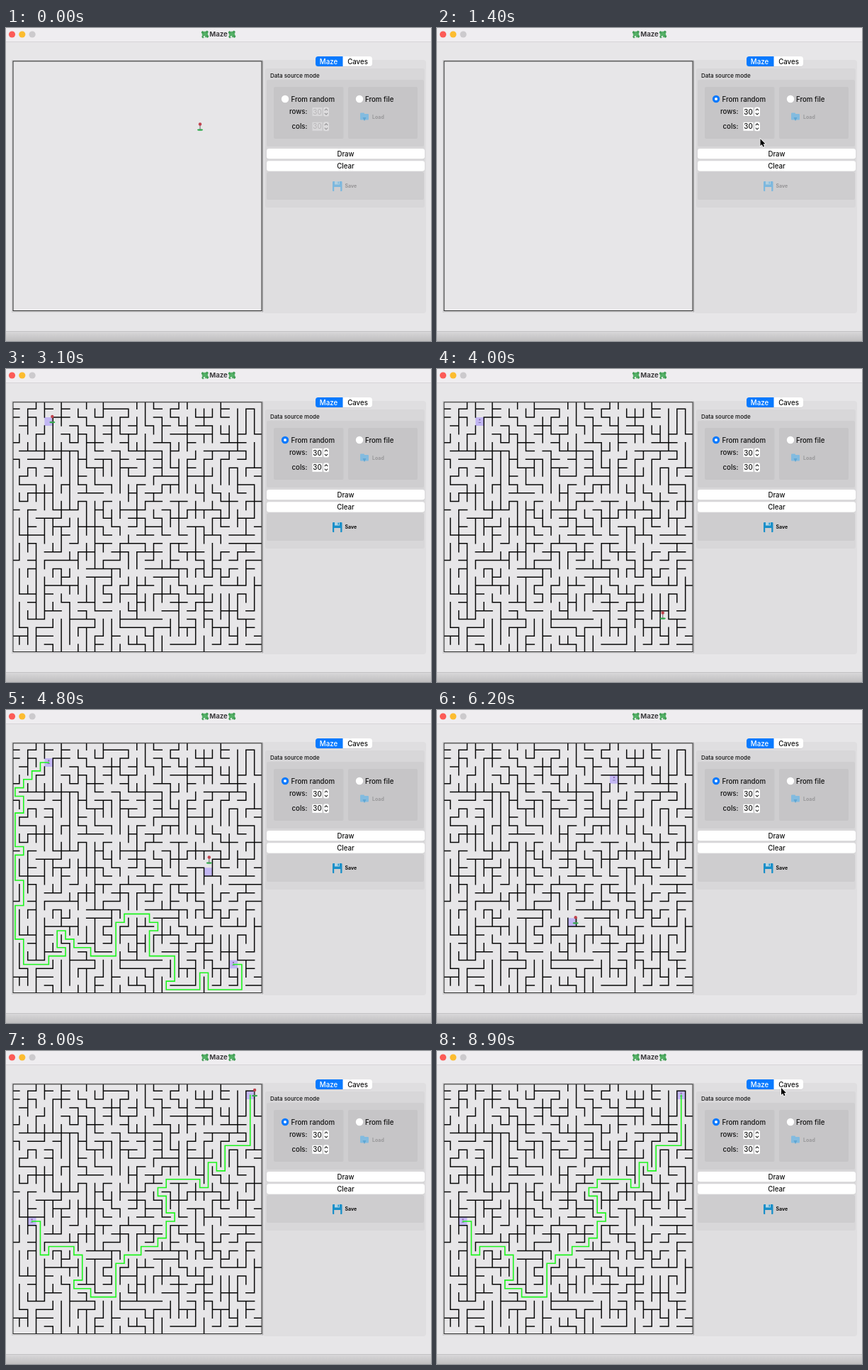
Animation, 600 px wide and 441 px high, one loop 9 s. Source, as an HTML page with a canvas:

```html
<!DOCTYPE html>
<html lang="en">
<head>
<meta charset="utf-8">
<title>Maze</title>
<style>
html, body { margin: 0; width: 100%; height: 100%; overflow: hidden; background: #e7e6e8; }
canvas { display: block; }
</style>
</head>
<body>
<canvas id="stage" width="600" height="441"></canvas>
<script>
const ctx = document.getElementById('stage').getContext('2d');
const LOOP = 9000, STEP = 100, LAG = 150;
const CHOOSE = 1000, DRAW = 1800;
const N = 30, CELL = 11.85, X0 = 7, Y0 = 44.4;
const FONT = 'Inter, "Open Sans", sans-serif';
const INK = '#101010';

// Key cells of the passages that are opened first; the rest of the maze is random.
const corridors = [
  [[4, 2], [0, 6], [1, 8], [0, 12], [1, 13], [0, 16], [1, 19], [0, 23], [1, 26], [4, 25], [6, 24], [5, 22],
    [7, 24], [9, 25], [12, 25], [12, 21], [13, 20], [16, 21], [17, 22], [16, 25], [19, 25], [19, 28],
    [18, 29], [22, 29], [22, 27], [23, 29], [27, 29], [27, 26], [26, 26]],
  [[2, 16], [3, 20], [4, 19], [7, 20], [8, 23], [7, 24]],
  [[13, 20], [17, 18], [19, 15], [17, 12], [18, 11], [22, 12], [23, 9], [24, 10], [25, 7], [28, 7], [28, 1]],
  [[15, 21], [15, 20]],
  [[20, 4], [20, 11]]
];

const trips = [
  [{ t: 3100, cell: [4, 2] }, { t: 4100, cell: [26, 26] }],
  [{ t: 4650, cell: [23, 15] }],
  [{ t: 5400, cell: [20, 4] }, { t: 6200, cell: [15, 21] }],
  [{ t: 7040, cell: [2, 16] }, { t: 7950, cell: [28, 1] }]
];

const stops = [
  { t: 0, x: 274, y: 143.5 },
  { t: 950, x: 393, y: 99 },
  { t: 1600, x: 475, y: 173 },
  { t: 2000, x: 475, y: 173 },
  ...trips.flat().map(({ t, cell: [c, r] }) => {
    const [x, y] = gridPoint(c + 0.5, r + 0.5);
    return { t, x: x + 5, y: y + 1 };
  }),
  { t: 8800, x: 486, y: 52 },
  { t: LOOP, x: 486, y: 52 }
];

const maze = buildMaze();
trips.forEach((clicks, i) => {
  clicks.end = i + 1 < trips.length ? trips[i + 1][0].t + LAG : LOOP;
  if (clicks.length > 1) clicks.route = solve(clicks[0].cell, clicks[1].cell);
});

function gridPoint(c, r) {
  return [X0 + c * CELL, Y0 + r * CELL];
}

function cellId([c, r]) {
  return r * N + c;
}

function seeded(seed) {
  return () => (seed = (seed * 48271) % 2147483647) / 2147483647;
}

// Joins two cells by even stairs, each step going across and then up or down.
function stairs([x0, y0], [x1, y1]) {
  const dx = x1 - x0, dy = y1 - y0;
  const n = Math.max(1, Math.min(Math.abs(dx), Math.abs(dy)));
  const cells = [[x0, y0]];
  let x = x0, y = y0;
  for (let k = 1; k <= n; k++) {
    const tx = Math.floor(x0 + dx * k / n), ty = Math.floor(y0 + dy * k / n);
    while (x !== tx) cells.push([x += Math.sign(dx), y]);
    while (y !== ty) cells.push([x, y += Math.sign(dy)]);
  }
  return cells;
}

function buildMaze() {
  const random = seeded(2029);
  const key = (a, b) => Math.min(a, b) + ':' + Math.max(a, b);
  const opened = new Set();
  for (const keys of corridors)
    for (let i = 1; i < keys.length; i++)
      stairs(keys[i - 1], keys[i]).map(cellId)
        .forEach((id, k, ids) => k && opened.add(key(ids[k - 1], id)));

  const edges = [];
  const addEdge = (from, to, line, bias) => {
    const a = cellId(from), b = cellId(to);
    edges.push({ a, b, line, order: opened.has(key(a, b)) ? -1 : random() * bias });
  };
  for (let r = 0; r < N; r++)
    for (let c = 0; c < N; c++) {
      if (c < N - 1) addEdge([c, r], [c + 1, r], [c + 1, r, c + 1, r + 1], 1);
      if (r < N - 1) addEdge([c, r], [c, r + 1], [c, r + 1, c + 1, r + 1], 0.75);
    }

  const parent = Array.from({ length: N * N }, (_, i) => i);
  const root = i => parent[i] === i ? i : (parent[i] = root(parent[i]));
  const links = parent.map(() => []), walls = [];
  for (const { a, b, line } of edges.sort((p, q) => p.order - q.order)) {
    const ra = root(a), rb = root(b);
    if (ra === rb) {
      walls.push(line);
    } else {
      parent[ra] = rb;
      links[a].push(b);
      links[b].push(a);
    }
  }
  return { walls, links };
}

function solve(start, goal) {
  const first = cellId(goal), last = cellId(start);
  const previous = new Map([[first, -1]]), queue = [first];
  for (const id of queue)
    for (const next of maze.links[id])
      if (!previous.has(next)) {
        previous.set(next, id);
        queue.push(next);
      }
  const points = [];
  for (let id = last; id >= 0; id = previous.get(id))
    points.push(gridPoint(id % N + 0.5, Math.floor(id / N) + 0.5));
  return points;
}

function box(x, y, w, h, fill, radius = 0) {
  ctx.fillStyle = fill;
  ctx.beginPath();
  ctx.roundRect(x, y, w, h, radius);
  ctx.fill();
}

function disc(x, y, radius, fill) {
  ctx.fillStyle = fill;
  ctx.beginPath();
  ctx.arc(x, y, radius, 0, Math.PI * 2);
  ctx.fill();
}

function label(text, x, y, { size = 9.7, fill = INK, align = 'left', weight = 500 } = {}) {
  ctx.font = `${weight} ${size}px ${FONT}`;
  ctx.textAlign = align;
  ctx.fillStyle = fill;
  ctx.fillText(text, x, y);
}

function poly(points, color, width) {
  ctx.strokeStyle = color;
  ctx.lineWidth = width;
  ctx.beginPath();
  points.forEach(([x, y]) => ctx.lineTo(x, y));
  ctx.stroke();
}

function puzzle(x, y) {
  ctx.save();
  ctx.translate(x, y);
  ctx.rotate(0.7);
  box(-3.4, -3.4, 6.8, 6.8, '#55b267', 1);
  [[0, -4.3], [4.3, 0], [-4.3, 0], [0, 4.3]].forEach(([dx, dy]) => disc(dx, dy, 1.9, '#459e58'));
  disc(1.2, 3.2, 1.2, '#efedf0');
  ctx.restore();
}

function drawWindow() {
  box(0, 0, 600, 441, '#e7e6e8');
  box(0, 0, 600, 19, '#efedf0');
  box(0, 19, 600, 1, '#d6d4d7');
  ['#fc5b57', '#fcbc30', '#cccacd'].forEach((fill, i) => disc(8.5 + i * 14.3, 9, 4.6, fill));
  puzzle(281, 9);
  puzzle(319, 9);
  label('Maze', 300, 12.2, { size: 9.6, fill: '#3d3b3e', align: 'center', weight: 700 });
  const bar = ctx.createLinearGradient(0, 428, 0, 441);
  bar.addColorStop(0, '#d8d7d9');
  bar.addColorStop(1, '#bfbebf');
  box(0, 428, 600, 13, bar);
  box(0, 427, 600, 1, '#c2c1c3');
}

function radio(x, y, on) {
  disc(x, y, 5.2, on ? '#0a7aff' : '#ffffff');
  if (on) disc(x, y, 2, '#ffffff');
}

function spinner(name, y, enabled) {
  label(name, 425.5, y + 3.4, { align: 'right' });
  box(432.5, y - 6, 14, 12, enabled ? '#ffffff' : '#d9d8da');
  label('30', 439.5, y + 3.5, { fill: enabled ? INK : '#b9b8ba', align: 'center' });
  box(448, y - 6.5, 8, 13, enabled ? '#ffffff' : '#dcdbdd', 2.5);
  for (const side of [-1, 1])
    poly([[449.8, y + 1.8 * side], [452, y + 4 * side], [454.2, y + 1.8 * side]], enabled ? '#333333' : '#969597', 1.1);
}

function loadIcon() {
  box(500, 119.5, 6, 4, '#83bbdf', 1);
  box(500, 121, 12, 8.5, '#83bbdf', 1);
  ctx.fillStyle = '#5fa6d3';
  ctx.beginPath();
  ctx.moveTo(503.5, 126);
  ctx.lineTo(508.5, 126);
  ctx.lineTo(506, 131);
  ctx.fill();
}

function saveIcon(enabled) {
  const blue = enabled ? '#188fc9' : '#7db8de';
  box(461, 216, 13.5, 14, blue, 1);
  box(464, 216, 7, 4.5, enabled ? '#b4d4e4' : '#b4cfdf');
  box(468.5, 216.5, 1.5, 3, blue);
  box(463.2, 224, 9, 6, '#cecdcf');
}

function button(text, y) {
  box(368, y + 0.6, 223, 14.4, '#bebdbf', 3);
  box(368, y, 223, 14.4, '#ffffff', 3);
  label(text, 479.5, y + 10.6, { align: 'center' });
}

function drawPanel(t) {
  const chosen = t >= CHOOSE, drawn = t >= DRAW;
  box(363, 45, 230, 357, '#dfdee0', 4);
  box(366, 57, 225, 196, '#d8d7d9', 3);
  box(368, 73, 222, 94, '#cfced0', 2);
  box(368, 203, 222, 39, '#cecdcf', 2);
  box(378, 83, 98.5, 73, '#c6c5c7', 2);
  box(483, 83, 98, 73, '#c6c5c7', 2);
  box(437, 40.5, 80, 14, '#c4c3c5', 3.5);
  box(437, 40, 80, 14, '#ffffff', 3.5);
  box(437, 40, 38.5, 14, '#087aff', [3.5, 0, 0, 3.5]);
  label('Maze', 455.5, 50.5, { fill: '#ffffff', align: 'center' });
  label('Caves', 496.5, 50.5, { align: 'center' });
  label('Data source mode', 373, 70.3, { size: 8 });
  radio(394, 100, chosen);
  radio(499, 100, false);
  label('From random', 402.5, 103.5);
  label('From file', 507, 103.5);
  spinner('rows:', 118, chosen);
  spinner('cols:', 138.8, chosen);
  loadIcon();
  label('Load', 517, 127.5, { size: 7, fill: '#99989a', weight: 700 });
  button('Draw', 170);
  button('Clear', 187.3);
  saveIcon(drawn);
  label('Save', 478.5, 225.3, { size: 7, fill: drawn ? INK : '#969597', weight: 700 });
}

function drawMark([c, r], settled) {
  const [x, y] = gridPoint(c, r);
  box(x, y, CELL, CELL, '#c2b6f3');
  if (!settled) return;
  disc(x + 5.9, y + 3.3, 1.1, '#87609f');
  box(x + 4.2, y + 6.8, 3.4, 1, '#7e78a8');
}

function drawMaze(t) {
  box(8, 45, 355, 356, '#cfced0');
  box(9, 46, 353, 354, '#e7e6e8');
  ctx.save();
  ctx.beginPath();
  ctx.rect(10, 47, 351, 351.5);
  ctx.clip();
  if (t >= DRAW) {
    const shown = trips.filter(clicks => t <= clicks.end);
    for (const click of shown.flat())
      if (t >= click.t) drawMark(click.cell, t > click.t + LAG);
    ctx.strokeStyle = '#080808';
    ctx.lineWidth = 1.5;
    ctx.lineCap = 'square';
    ctx.beginPath();
    for (const [x0, y0, x1, y1] of maze.walls) {
      ctx.moveTo(...gridPoint(x0, y0));
      ctx.lineTo(...gridPoint(x1, y1));
    }
    ctx.stroke();
    for (const { 1: goal, route } of shown)
      if (route && t >= goal.t + STEP / 2) poly(route, '#1df51d', 1.6);
  }
  ctx.restore();
  ctx.strokeStyle = '#222222';
  ctx.lineWidth = 1;
  ctx.strokeRect(10, 46.8, 351, 351.7);
  box(362, 46, 1, 354, '#a3a2a4');
}

function pointerAt(t) {
  const i = stops.findIndex(stop => stop.t > t);
  const a = stops[i - 1], b = stops[i];
  const u = (t - a.t) / (b.t - a.t), p = u * u * (3 - 2 * u);
  return [a.x + (b.x - a.x) * p, a.y + (b.y - a.y) * p];
}

function drawPin(x, y) {
  ctx.fillStyle = '#31ad4d';
  ctx.beginPath();
  ctx.ellipse(x, y, 4, 1.3, 0, 0, Math.PI * 2);
  ctx.fill();
  poly([[x, y - 7], [x, y]], '#777477', 1.1);
  disc(x, y - 8, 2.2, '#c0434d');
}

function drawArrow(x, y) {
  ctx.beginPath();
  [[0, 0], [0, 9.8], [2.3, 7.8], [3.8, 11.2], [5.5, 10.4], [4, 7.2], [7, 7]]
    .forEach(([dx, dy]) => ctx.lineTo(x + dx, y + dy));
  ctx.closePath();
  ctx.strokeStyle = '#ffffff';
  ctx.lineWidth = 1.4;
  ctx.stroke();
  ctx.fillStyle = '#000000';
  ctx.fill();
}

function draw(now) {
  const t = Math.floor((now % LOOP) / STEP) * STEP;
  drawWindow();
  drawPanel(t);
  drawMaze(t);
  const [x, y] = pointerAt(t);
  if (x < 362) drawPin(x, y); else drawArrow(x, y);
}

const start = performance.now();
function tick() {
  draw(performance.now() - start);
  requestAnimationFrame(tick);
}
tick();
</script>
</body>
</html>
```
